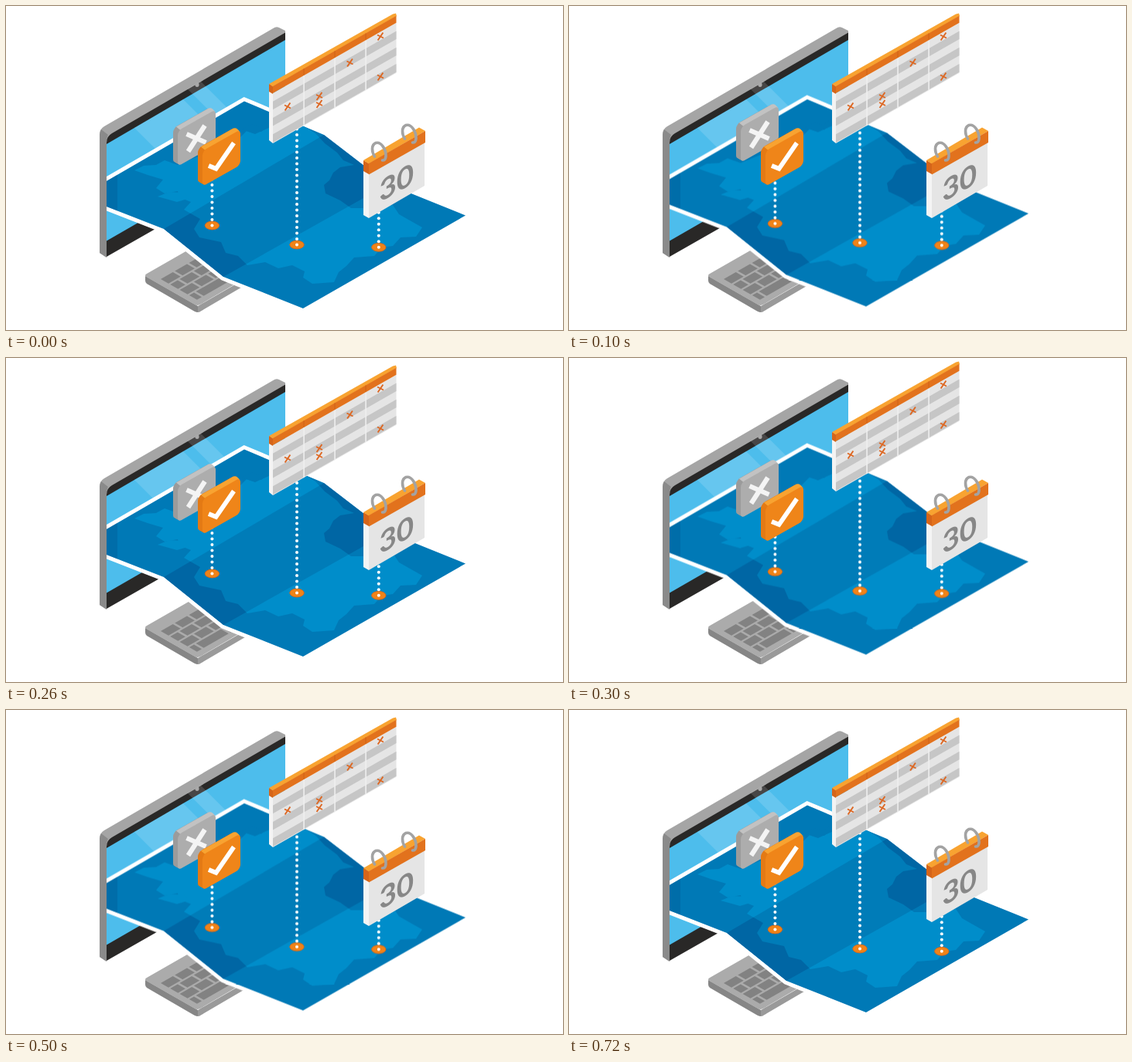
These frames come from a looping animation (720 by 420 pixels, 0.8 s). An HTML page:

```html
<!DOCTYPE html>
<html lang="en">
<head>
<meta charset="utf-8">
<title>Planning map</title>
<style>
html, body { margin: 0; width: 100%; height: 100%; overflow: hidden; background: #fff; }
svg { display: block; width: 720px; height: 420px; }
.day { font: 700 38.5px Lato, Inter, sans-serif; fill: #878787; }
</style>
</head>
<body>
<svg viewBox="0 0 720 420">
  <defs>
    <path id="paper" d="M98,247.5 L204,289 281,351 384,392 594,271.5 494,231 411,167 308,123.5 98,245.5Z"/>
    <clipPath id="stage"><rect x="130" y="0" width="590" height="420"/></clipPath>
    <clipPath id="sheet"><use href="#paper"/></clipPath>
    <clipPath id="glass"><path d="M130,168 L361,34 V193 L130,326Z"/></clipPath>
    <clipPath id="screen"><path d="M130,179 L361,44 V171 L130,304.500Z"/></clipPath>
  </defs>

  <g id="keyboard">
    <path fill="#868686" d="M180,350 L248,389 V397 Q246,397 243,395.500 L182,360 Q180,358.500 180,356Z"/>
    <path fill="#9a9a9a" d="M248,389 L360,324 V332 L252,395.500 Q250,397 248,397Z"/>
    <path fill="#ababab" d="M182,347 L292,284 360,323 252,386.500 Q248,389 244,387 L182,351.500 Q178,349 182,347Z"/>
    <g id="keys" fill="#828282"></g>
  </g>

  <g id="monitor">
    <path fill="#a5a5a5" d="M121,168 Q121,159 127,156 L347,28 Q350,26.5 353,28 L361,32 V38 L137,168 Q130,171 130,178 V326 L121,320Z"/>
    <path fill="#8a8a8a" d="M121,167 Q121,163 123,160 L132,167 Q130,170 130,178 V326 L121,320Z"/>
    <path fill="#292827" d="M130,325 V177 Q130,169 137,165 L361,34.500 V193Z"/>
    <path fill="#4dbdec" d="M130,179 L361,44 V171 L130,304.500Z"/>
    <path clip-path="url(#screen)" fill="#fff" fill-opacity=".14" d="M165,157 L228,120 310,202 247,239Z"/>
    <path clip-path="url(#glass)" fill="#fff" fill-opacity=".14" d="M231,104 L248,94 335,181 318,191Z"/>
    <ellipse cx="247" cy="102" rx="2.6" ry="3" fill="#a9a9a9"/>
  </g>

  <g clip-path="url(#stage)">
    <g id="map">
      <use href="#paper" fill="#fff" stroke="#fff" stroke-width="10"/>
      <g clip-path="url(#sheet)">
        <path fill="#0079b6" d="M90,100 H600 V400 H90Z"/>
        <path fill="#0071b0" d="M204,289 L281,351 494,231 411,167Z"/>
        <path fill="#008dca" d="M166,213 L178,207 194,206 205,200 222,206 246,196 272,190 300,173 311,162 330,163 338,156 352,158 372,148 400,165
          412,178 428,190 436,200 450,206 432,209 423,216 418,226 411,232 413,243 432,252 446,262 470,262 500,258 508,270 522,278 538,287 530,299
          510,300 500,311 486,313 476,324 450,326 440,337 430,345 424,358 396,360 384,352 386,344 370,336 352,340 335,332 312,336 300,324
          284,320 278,306 250,300 243,289 251,276 230,264 239,254 224,248 222,240 205,243 194,236 203,225 183,219Z"/>
        <path fill="#0079b6" d="M304,160 L318,153 328,157 336,151 342,157 322,166Z"/>
        <path fill="#008dca" d="M196,247 L211,241 230,242 238,249 221,254Z"/>
        <path fill="#003f78" fill-opacity=".22" d="M204,289 L281,351 494,231 411,167Z"/>
        <path fill="#00508c" fill-opacity=".3" d="M130,200 H144 V290 H130Z"/>
      </g>
      <g id="pins"></g>
    </g>
  </g>

  <g id="cross"></g>
  <g id="tick"></g>

  <g id="table">
    <path fill="#f3f3f3" d="M340,110 L345,113 V178 L340,174Z"/>
    <path fill="#d5651a" d="M340,101 L345,104 V114 L340,111Z"/>
    <path fill="#f8a331" d="M340,101 L500,10.5 504,9.5 505,13 345,104.5Z"/>
    <g id="grid" transform="matrix(1,-.572,0,1,345,104)"></g>
    <g id="marks" stroke="#dd6722" stroke-width="1.9"></g>
  </g>

  <g id="calendar">
    <path fill="#f4f4f4" d="M462,213 L469,217 V275 L462,271Z"/>
    <path fill="#e5e5e5" d="M469,217 L541,176 V233 L469,275Z"/>
    <path fill="#d5651a" d="M462,200 L469,204 V218 L462,214Z"/>
    <path fill="#f8a331" d="M462,200 L534,157.5 542,162 469,204.5Z"/>
    <path fill="#e2721d" d="M469,204 L542,162 V177 L469,218.5Z"/>
    <g id="rings" fill="none" stroke="#a3a3a3" stroke-width="3.6" stroke-linecap="round"></g>
    <text class="day" transform="matrix(1,-.575,0,1,482.500,255)">30</text>
  </g>
</svg>

<script>
const NS = 'http://www.w3.org/2000/svg';
const get = id => document.getElementById(id);

function add(parent, tag, attrs) {
  const el = document.createElementNS(NS, tag);
  for (const key in attrs) el.setAttribute(key, attrs[key]);
  parent.append(el);
  return el;
}

// Keyboard: rows run up to the right, each one nearer than the last
[[21, 21, 21], [14, 21, 21, 21], [21, 21, 21, 21], [10, 40, 21]].forEach((row, r) => {
  let along = 0;
  for (const len of row) {
    const x = 200 + r * 12.3 + along * .87, y = 354 + r * 7 - along * .5;
    const w = (len - 3) * .87, h = (len - 3) * .5;
    add(get('keys'), 'path', { d: `M${x},${y} l${w},${-h} 10,5.7 ${-w},${h}z` });
    along += len;
  }
});

// Pins with their dotted stems
[[266.4, 284.5, 10], [376, 309.5, 23], [481.8, 312.8, 8]].forEach(([x, y, count]) => {
  const pins = get('pins');
  add(pins, 'ellipse', { cx: x, cy: y, rx: 9.2, ry: 5.4, fill: '#ef8318', stroke: '#d8691a', 'stroke-width': 1 });
  for (let i = 0; i < count; i++)
    add(pins, 'circle', { cx: x, cy: y - i * 7.5, r: 2, fill: '#fff' });
});

// Rounded tile with depth
function tile(id, x, y, front, side, top) {
  const g = get(id);
  const face = (k, fill) => add(g, 'rect', {
    width: 49, height: 46, rx: 5.5, fill,
    transform: `matrix(1,-.57,0,1,${x - k * 6},${y - k * 3.5})`
  });
  for (let i = 6; i > 0; i--) face(i / 6, side);
  add(g, 'path', { fill: top, d: `M${x - 2},${y - 5.5} l42,-24 q3,-1 5,1 l3,3 -44,25z` });
  face(0, front);
  return g;
}
const cross = tile('cross', 222, 162, '#adadad', '#9b9b9b', '#c2c2c2');
add(cross, 'path', { d: 'M233.5,166 L258.500,177 M257,155 L235.500,188.5', stroke: '#f4f4f4', 'stroke-width': 6.2 });
const tick = tile('tick', 254, 188, '#ef8519', '#e47a14', '#f8a331');
add(tick, 'path', { d: 'M262,207 L271.5,211 294.500,177.500', fill: 'none', stroke: '#fff', 'stroke-width': 5.8 });

// Table
const grid = get('grid'), headH = 9, rowH = 10.65, tableW = 159.5;
const block = (x, y, width, height, fill) => add(grid, 'rect', { x, y, width, height, fill });
block(0, headH, tableW, 65, '#e5e5e5');
block(0, 0, tableW, headH, '#e2721d');
for (let r = 1; r < 6; r += 2) block(0, headH + r * rowH, tableW, rowH, '#c6c6c6');
for (let c = 1; c < 4; c++) {
  block(c * 40 - .7, headH, 1.6, 65, '#efefef');
  block(c * 40 - .4, 0, .8, headH, '#c95f18');
}
[[364, 130.5], [405, 117], [405, 127], [444.5, 73.5], [484, 39.5], [484, 91.5]].forEach(([x, y]) =>
  add(get('marks'), 'path', { d: `M${x - 4},${y - 2} l8,4 M${x + 3.4},${y - 5} l-6.8,10` }));

// Calendar rings
for (let i = 0; i < 2; i++)
  add(get('rings'), 'path', {
    d: 'M476.5,195 C472.5,189 472,180 478,177.5 C485,175.5 491.5,186 491,195 Q490.5,200.500 486.5,200',
    transform: `translate(${i * 39},${i * -23})`
  });

// Vertical offset of each part, held for one tenth of a second each
const lifts = {
  map:      [0, -2.5, -5, -7.5, -5, -2.5, 0, 0],
  cross:    [0, -5, 5, 0, 0, 0, 0, 0],
  tick:     [0, 0, -5, 5, 0, 0, 0, 0],
  table:    [0, 0, 0, -5, 5, 0, 0, 0],
  calendar: [0, 0, 0, 0, -5, 5, 0, 0]
};
for (const id in lifts) {
  const steps = lifts[id].map((y, i) => ({ transform: `translateY(${y}px)`, offset: i / 8, easing: 'step-end' }));
  steps.push({ transform: 'translateY(0px)', offset: 1 });
  get(id).animate(steps, { duration: 800, iterations: Infinity });
}
</script>
</body>
</html>
```
